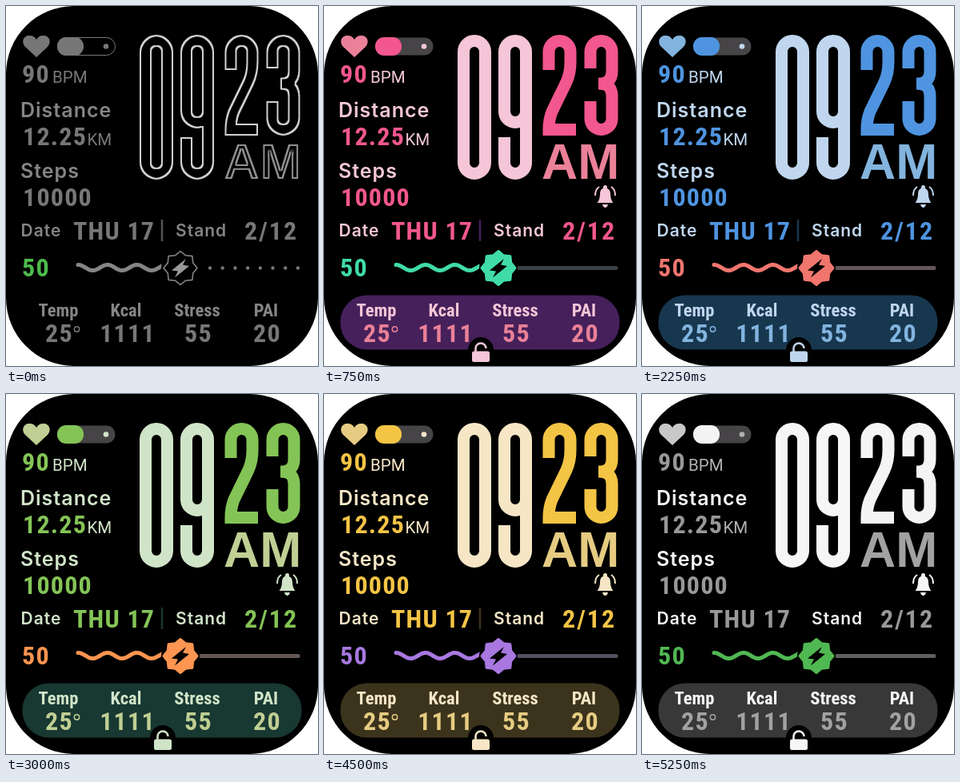
Recreate the animation shown at these times as an HTML page. Size 390 by 450 pixels, loop 6000 ms.

```html
<!DOCTYPE html>
<html lang="en">
<head>
<meta charset="utf-8">
<title>Watch face themes</title>
<style>
  html, body { margin: 0; width: 100%; height: 100%; overflow: hidden; background: #fff; }
  svg { display: block; width: 390px; height: 450px; }
  .light { fill: var(--light); }
  .main { fill: var(--main); }
  .accent { fill: var(--accent); }
  .unit { fill: var(--unit); }
  text.unit { font: 400 20.5px Roboto, sans-serif; }
  .value { font: 600 32px "Roboto Condensed", Roboto, sans-serif; font-stretch: 75%; letter-spacing: 1.2px; }
  .label { fill: var(--light); font: 600 25px Inter, sans-serif; letter-spacing: 1px; }
  .label.small { font-size: 21px; }
  .metric { fill: var(--light); font: 600 22.5px "Roboto Condensed", Roboto, sans-serif; font-stretch: 75%; }
  .mid { text-anchor: middle; }
  .ampm { font: 700 62.5px "Liberation Sans", Arial, sans-serif; }
  .digit { fill: none; stroke-width: 15; }
  .hour { stroke: var(--light); }
  .minute { stroke: var(--time); }
  .batt { fill: var(--batt); }
  .line { fill: none; stroke: var(--batt); stroke-width: 5; stroke-linecap: round; }
  #gear { fill: var(--batt); stroke: var(--batt); stroke-width: 3; stroke-linejoin: round; }
  .dim #gear { fill: #000; stroke-width: 1.6; }
  .dim .line, .dim #gear { stroke: #858585; }
  .dim .bolt { fill: #999; }
  .dim .pill { fill: none; stroke: #777; }
  .dim .outlined { filter: url(#outline); }
  .dim .digit { stroke: #d0d0d0; }
  .dim .ampm { fill: #909090; }
  .dim .lit, svg:not(.dim) .dots { display: none; }
</style>
</head>
<body>
<svg id="face" viewBox="0 0 390 450">
  <filter id="outline" x="-5%" y="-5%" width="110%" height="110%">
    <feMorphology operator="erode" radius="2"/>
    <feComposite in="SourceGraphic" operator="out"/>
  </filter>
  <rect width="390" height="450" rx="85"/>

  <path fill="var(--heart)" d="M38 64L24 51C18 44 23 36 30 37Q35 37 38 42Q41 37 46 37C53 36 58 44 52 51Z"/>
  <rect class="pill" x="64.5" y="39.5" width="72" height="22" rx="11" fill="#464446"/>
  <rect x="64" y="39" width="33" height="23" rx="11" fill="var(--time)"/>
  <circle class="unit" cx="125" cy="50.5" r="3.3"/>

  <text class="value main" x="20" y="96">90</text>
  <text class="unit" x="58" y="96">BPM</text>
  <text class="label" x="18" y="139">Distance</text>
  <text class="value main" x="21" y="174">12.25</text>
  <text class="unit" x="101.5" y="174">KM</text>
  <text class="label" x="18" y="215">Steps</text>
  <text class="value main" x="21" y="250">10000</text>

  <g class="outlined">
    <g class="digit hour">
      <rect x="174.500" y="43.500" width="27" height="166" rx="13.500"/>
      <path d="M252.500 132a13.500 13.500 0 0 1-27 0V57a13.500 13.500 0 0 1 27 0V196a13.500 13.500 0 0 1-27 0V164"/>
    </g>
    <g class="digit minute">
      <path d="M281 80V57a13.500 13.500 0 0 1 27 0V70Q308 84 303 95L285 132Q281 142 281 154.500H315"/>
      <path d="M333 78V57a13.500 13.500 0 0 1 27 0V82Q360 97 343 97Q360 97 360 112V141a13.500 13.500 0 0 1-27 0V119"/>
    </g>
    <text class="ampm accent" x="272" y="216">AM</text>
  </g>

  <g class="lit light">
    <path d="M341.500 246Q345 242 345 235Q345 228 351 227Q358 228 358 235Q358 242 361.500 246ZM348 248H355Q354 252 351.500 252Q349 252 348 248Z"/>
    <circle cx="351.500" cy="226.500" r="2.500"/>
    <path d="M344 226Q339 229 339 237M359 226Q364 229 364 237" fill="none" stroke="var(--light)" stroke-width="2"/>
  </g>

  <text class="label small" x="18.500" y="288">Date</text>
  <text class="value main" x="84" y="292">THU 17</text>
  <path d="M195 267V294" stroke="var(--split)" stroke-width="2.500"/>
  <text class="label small" x="212" y="288">Stand</text>
  <text class="value main" x="298" y="292" style="letter-spacing: 2px">2/12</text>

  <text class="value batt" x="20" y="338">50</text>
  <path class="line" id="wave"/>
  <path class="lit" d="M243 327.500H365" stroke="var(--track)" stroke-width="5" stroke-linecap="round"/>
  <path class="dots" d="M255 327.500H367" stroke="#777" stroke-width="4.400" stroke-linecap="round" stroke-dasharray="0 15.700"/>
  <circle cx="218" cy="327.500" r="24"/>
  <path id="gear"/>
  <path class="bolt" d="M225 316L207 330.500L215 331.500L211 339.500L229 325L221 323.500Z"/>

  <rect class="lit" x="20.500" y="361.500" width="349" height="68" rx="33" fill="var(--panel)"/>
  <g class="mid">
    <text class="metric" x="65.500" y="388">Temp</text>
    <text class="metric" x="150" y="388">Kcal</text>
    <text class="metric" x="239" y="388">Stress</text>
    <text class="metric" x="325" y="388">PAI</text>
    <g class="value accent">
      <text x="66.500" y="420">25</text>
      <text x="152" y="420" id="kcal">1111</text>
      <text x="240.500" y="420">55</text>
      <text x="326.500" y="420">20</text>
    </g>
  </g>
  <circle cx="88.500" cy="404" r="3.200" fill="none" stroke="var(--accent)" stroke-width="1.400"/>

  <g class="lit">
    <circle cx="196" cy="430" r="16"/>
    <rect class="light" x="185" y="431.500" width="22" height="13.500" rx="2.500"/>
    <path d="M189.500 433V428a6.500 6.500 0 0 1 13 0" fill="none" stroke="var(--light)" stroke-width="2.500"/>
  </g>
</svg>
<script>
const STEP = 750;
const themes = [
  { light: '#858585', main: '#777', accent: '#777', batt: '#4dbb4b', panel: '#000', track: '#000',
    unit: '#777', split: '#555', dim: true },
  { light: '#f4c6d7', main: '#f2578e', accent: '#ea8198', batt: '#40dca8', panel: '#46205a', track: '#384244' },
  { light: '#cbb9dd', main: '#965cd2', accent: '#aa86c0', batt: '#fec974', panel: '#232357', track: '#655a55', kcal: 1109 },
  { light: '#bfd6ee', main: '#4f94e0', accent: '#82b4de', batt: '#f0766e', panel: '#17374f', track: '#625658' },
  { light: '#d0e4c8', main: '#84c456', accent: '#c0cf93', batt: '#fe9550', panel: '#183832', track: '#655852' },
  { light: '#f5dfc9', main: '#fa9049', accent: '#f9bd77', batt: '#4db5ea', panel: '#3d2a1e', track: '#505b6b' },
  { light: '#f6e6c6', main: '#f4c445', accent: '#e6cc82', batt: '#a878e0', panel: '#3b331c', track: '#56505f' },
  { light: '#f6f6f6', main: '#989898', accent: '#a2a2a2', batt: '#50b852', panel: '#383838', track: '#5c605b',
    time: '#f4f4f4', unit: '#b0b0b0', heart: '#c8c8c8', split: '#000' }
];
const byId = id => document.getElementById(id);
const face = byId('face');
const polyline = points => 'M' + points.map(p => p.map(v => v.toFixed(2)).join(' ')).join('L');

byId('wave').setAttribute('d', polyline(Array.from({ length: 56 }, (_, i) =>
  [90 + 2 * i, 327 - 3.6 * Math.cos(i * Math.PI / 9.2)])));
byId('gear').setAttribute('d', polyline(Array.from({ length: 16 }, (_, i) => {
  const r = i % 2 ? 17 : 21, a = i * Math.PI / 8;
  return [218 + r * Math.cos(a), 327.5 + r * Math.sin(a)];
})) + 'Z');

let shown = -1;
function draw(now) {
  const index = Math.floor(now / STEP) % themes.length;
  if (index !== shown) {
    const { dim = false, kcal = 1111, ...colors } = themes[shown = index];
    const { light, main, accent, panel } = colors;
    const palette = { time: main, unit: light, heart: accent, split: panel, ...colors };
    for (const name in palette) face.style.setProperty('--' + name, palette[name]);
    face.classList.toggle('dim', dim);
    byId('kcal').textContent = kcal;
  }
  requestAnimationFrame(draw);
}
draw(performance.now());
</script>
</body>
</html>
```
